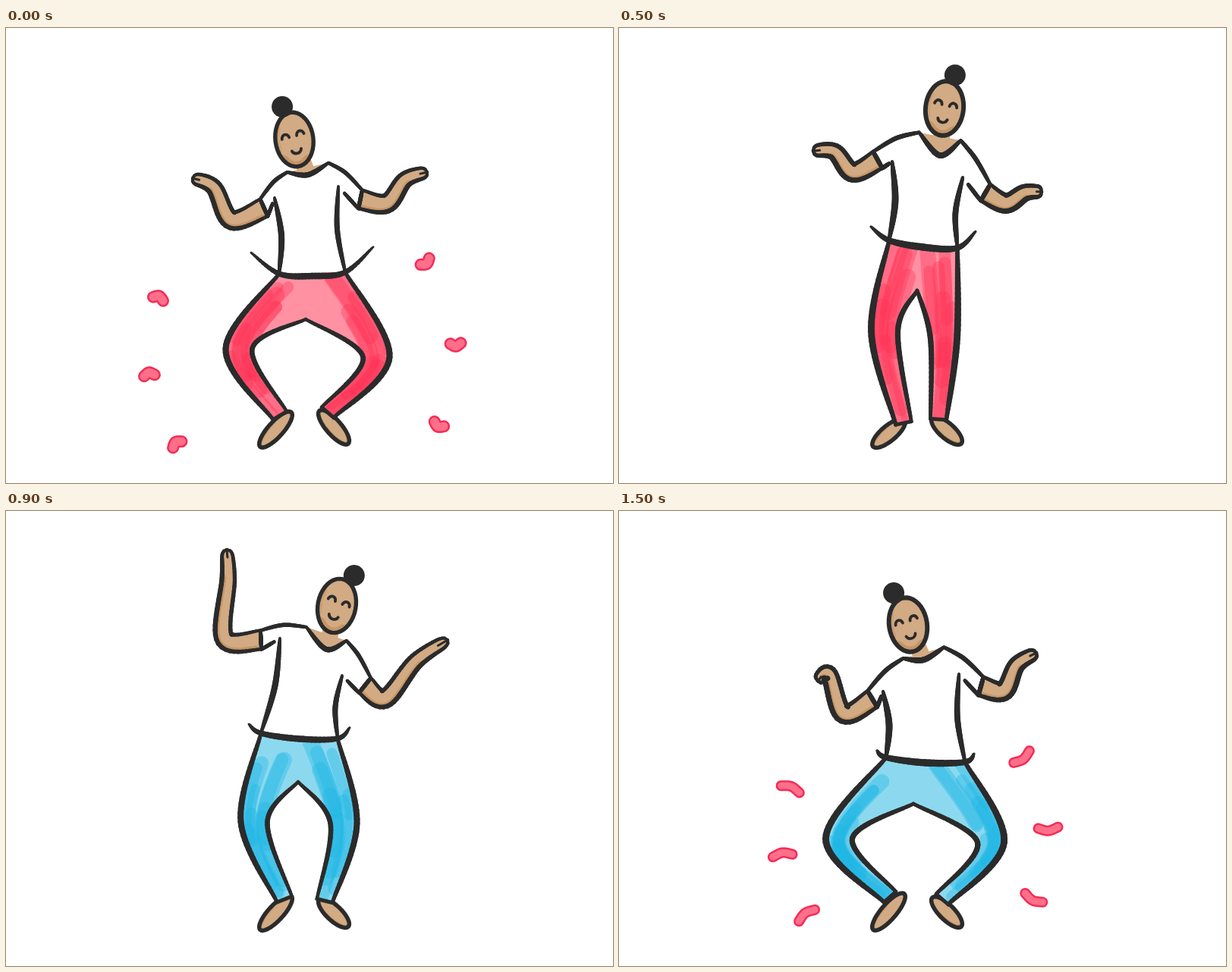
Write an HTML page with a canvas that moves like this. It is 800 px wide and 600 px high and loops after 1.6 s.

```html
<!DOCTYPE html>
<html lang="en">
<head>
<meta charset="utf-8">
<title>Dancer</title>
<style>
html, body { margin: 0; width: 100%; height: 100%; overflow: hidden; background: #fff; }
canvas { display: block; }
</style>
</head>
<body>
<canvas id="stage" width="800" height="600"></canvas>
<script>
const ctx = document.getElementById('stage').getContext('2d');
const STEP = 100, STEPS = 16, SAMPLES = 40;
const INK = '#2b2b2b', SKIN = ['#d2aa83', '#a8651c'];
const PINK = ['#ff91a3', '#ff3155'], BLUE = ['#8cd9ef', '#1cb3e2'];
const PINK_DASH = ['#ff6f8a', '#f42c55'], BLUE_DASH = ['#8adaf2', '#5cc5e6'];

// Joints of the key poses. pen: ink weight, flare of the shirt hem; head: x, y, tilt;
// arms: sleeve, elbow, wrist, fingertip; body: armpits, hips, crotch; legs: knee and ankle, twice.
const poses = [
  { at: 0, pen: [1, 37], head: [380, 147, -15],
    armL: [340, 237, 297, 253, 274, 210, 246, 198], armR: [467, 226, 502, 231, 526, 200, 555, 190],
    body: [354, 224, 438, 209, 360, 324, 447, 322, 395, 384], legs: [307, 423, 361, 511, 488, 434, 424, 507] },
  { at: 3, pen: [1, 8], head: [401, 100, -2],
    armL: [330, 166, 286, 170, 293, 218, 288, 250], armR: [490, 167, 520, 180, 506, 215, 497, 247],
    body: [352, 180, 482, 185, 355, 291, 454, 298, 403, 343], legs: [367, 400, 369, 523, 433, 400, 418, 520] },
  { at: 5, pen: [1.1, 24], head: [429, 106, 13],
    armL: [341, 174, 308, 190, 284, 163, 256, 162], armR: [483, 217, 510, 231, 535, 217, 557, 216],
    body: [360, 176, 453, 197, 356, 280, 446, 290, 393, 346], legs: [350, 400, 375, 521, 428, 410, 421, 516] },
  { at: 7, pen: [.95, 14], head: [443, 169, 24],
    armL: [350, 233, 309, 245, 308, 180, 287, 181], armR: [468, 280, 492, 304, 525, 266, 500, 252],
    body: [364, 233, 448, 253, 343, 334, 446, 341, 395, 399], legs: [277, 437, 353, 505, 498, 436, 428, 506] },
  { at: 9, pen: [1, 16], head: [436, 125, 22],
    armL: [336, 170, 288, 168, 293, 90, 291, 51], armR: [473, 230, 500, 247, 540, 198, 582, 170],
    body: [361, 168, 443, 217, 336, 293, 437, 300, 385, 357], legs: [327, 410, 367, 512, 445, 412, 420, 514] },
  { at: 13, pen: [1.4, 13], head: [388, 94, -10],
    armL: [331, 196, 292, 208, 266, 165, 239, 137], armR: [469, 188, 505, 202, 540, 170, 560, 196],
    body: [350, 186, 456, 182, 347, 292, 444, 297, 393, 342], legs: [344, 405, 368, 518, 430, 413, 412, 518] },
  { at: 15, pen: [1.1, 12], head: [381, 150, -18],
    armL: [334, 248, 296, 267, 277, 215, 262, 224], armR: [477, 231, 507, 237, 524, 203, 550, 187],
    body: [348, 238, 448, 215, 352, 325, 456, 331, 388, 386], legs: [290, 432, 357, 509, 490, 437, 426, 512] }
];

// Dashes fly outwards on a ring: [radius, length, width] per step.
const pinkAngles = [-37, -4, 27, 144, 172, 201], blueAngles = [-29, -2, 21, 146, 178, 220];
const bursts = { 15: [176, 13, 14], 0: [203, 7, 16], 7: [188, 20, 14], 8: [215, 10, 14] };

const rad = degrees => degrees * Math.PI / 180;
const noise = n => { const v = Math.sin(n * 12.9898) * 43758.5453; return v - Math.floor(v); };
const pairs = a => Array.from({ length: a.length / 2 }, (_, i) => [a[2 * i], a[2 * i + 1]]);
const add = ([x, y], dx, dy) => [x + dx, y + dy];
const mix = ([ax, ay], [bx, by], k = .5) => [ax + (bx - ax) * k, ay + (by - ay) * k];
const turn = (x, y, a) => [x * Math.cos(a) - y * Math.sin(a), x * Math.sin(a) + y * Math.cos(a)];

// Catmull-Rom step from b to c, used both for outlines and for motion.
const glide = (a, b, c, d, f) =>
  b + f / 2 * (c - a + f * (2 * a - 5 * b + 4 * c - d + f * (3 * (b - c) + d - a)));

function curve(...points) {
  const last = points.length - 1;
  return Array.from({ length: SAMPLES + 1 }, (_, n) => {
    const u = n / SAMPLES * last, i = Math.min(last - 1, Math.floor(u));
    const [a, b, c, d] = [points[Math.max(0, i - 1)], points[i], points[i + 1], points[Math.min(last, i + 2)]];
    return [0, 1].map(j => glide(a[j], b[j], c[j], d[j], u - i));
  });
}

const bow = (a, b, dx, dy) => curve(a, add(mix(a, b), dx, dy), b);

function poseAt(step) {
  const i = poses.findLastIndex(p => p.at <= step), n = poses.length;
  const [a, b, c, d] = [-1, 0, 1, 2].map(k => poses[(i + k + n) % n]);
  const f = (step - b.at) / (c.at - b.at), pose = {};
  for (const key of ['pen', 'head', 'armL', 'armR', 'body', 'legs']) {
    pose[key] = b[key].map((v, j) => glide(a[key][j], v, c[key][j], d[key][j], f));
  }
  return pose;
}

function trace(points) {
  ctx.beginPath();
  points.forEach(p => ctx.lineTo(...p));
}

function line(points, width, color = INK) {
  trace(points);
  ctx.lineWidth = width;
  ctx.strokeStyle = color;
  ctx.stroke();
}

let pen = 1;
// A brush line that swells from its ends to its middle.
function ink(points, end, middle) {
  for (let i = 1; i < points.length; i++) {
    line([points[i - 1], points[i]], pen * (end + (middle - end) * Math.sin(Math.PI * i / points.length)));
  }
}

// Fills a shape, then lays translucent strokes inside it: [points, width, alpha].
function wash(shape, [light, dark], strokes = []) {
  ctx.save();
  trace(shape);
  ctx.fillStyle = light;
  ctx.fill();
  ctx.clip();
  for (const [points, width, alpha] of strokes) {
    ctx.globalAlpha = alpha;
    line(points, width, dark);
  }
  ctx.restore();
}

const oval = (x, y, rx, ry, tilt) => Array.from({ length: SAMPLES + 1 }, (_, i) => {
  const a = i / SAMPLES * 2 * Math.PI;
  return add([x, y], ...turn(rx * Math.cos(a), ry * Math.sin(a), tilt));
});

function drawFoot(heel, toe) {
  const [dx, dy] = [toe[0] - heel[0], toe[1] - heel[1]];
  const shape = oval(...mix(heel, toe), Math.hypot(dx, dy) / 2 + 3, 10, Math.atan2(dy, dx));
  wash(shape, SKIN, [[shape.slice(0, 12), 8, .2]]);
  line(shape, 5.5);
}

// Offsets one side of an arm; it narrows to the wrist and rounds off at the fingertips.
function armSide(middle, side) {
  return middle.map((p, i) => {
    const [a, b] = [middle[Math.max(0, i - 1)], middle[Math.min(SAMPLES, i + 1)]];
    const t = i / SAMPLES, tip = Math.max(0, t - .88) / .12, angle = Math.atan2(b[1] - a[1], b[0] - a[0]);
    return add(p, ...turn(0, side * (12.5 - 6 * t) * Math.sqrt(1 - tip * tip), angle));
  });
}

function drawArm(joints, side, neck, armpit) {
  const middle = curve(...pairs(joints)), top = armSide(middle, side), low = armSide(middle, -side);
  wash([...top, ...low.slice().reverse()], SKIN, [[low.slice(3, 28), 11, .3]]);
  ink(top, 4, 5.5);
  ink(low, 4, 6.5);
  line(middle.slice(35), 3);
  ink(curve(top[0], low[0]), 4.5, 5.5);
  ink(curve(low[0], mix(low[0], armpit, .7)), 4, 5);
  ink(bow(neck, top[0], 0, -5), 4, 5.5);
}

function legSides(hip, crotch, knee, ankle, side) {
  const angle = Math.atan2(ankle[1] - knee[1], ankle[0] - knee[0]);
  const edge = (start, out) => curve(start, add(knee, out * 17.5, 0), add(ankle, ...turn(0, -out * 10.5, angle)));
  return [edge(hip, side), edge(crotch, -side)];
}

function drawPants(hips, crotch, legs, step) {
  const strokes = [], waist = mix(...hips);
  const sides = hips.map((hip, n) => {
    const [knee, ankle] = legs.slice(2 * n), side = n ? 1 : -1;
    const [outer, centre] = legSides(hip, waist, knee, ankle, side);
    for (let j = 0; j < 9; j++) {
      const r = k => noise(step * 31 + n * 97 + j * 7 + k), from = Math.floor(r(1) * 24), across = .1 + .8 * r(2);
      const band = outer.map((p, i) => mix(p, centre[i], across));
      strokes.push([band.slice(from, from + 12 + 14 * r(3)), 12 + 10 * r(4), .36]);
    }
    return legSides(hip, crotch, knee, ankle, side);
  });
  const [[lo, li], [ro, ri]] = sides;
  wash([...lo, ...li.slice().reverse(), ...ri, ...ro.slice().reverse()], step < 8 ? PINK : BLUE, strokes);
  for (const [outer, inner] of sides) {
    ink(outer, 4.5, 8);
    ink(inner, 4, 6.5);
    line([outer[SAMPLES], inner[SAMPLES]], 5);
  }
}

function arc(centre, radius, tilt, from, to) {
  ctx.beginPath();
  ctx.ellipse(...centre, radius, 6, tilt, from, to);
  ctx.lineWidth = 3.8;
  ctx.strokeStyle = INK;
  ctx.stroke();
}

function drawHead([x, y], tilt, collar) {
  const centre = [x, y], shape = oval(x, y, 25, 36, tilt / 2);
  wash(collar, SKIN);
  ctx.lineCap = 'butt';
  line([centre, collar[SAMPLES / 2]], 22, SKIN[0]);
  ctx.lineCap = 'round';
  ink(collar, 3.5, 7);
  wash(shape, SKIN, [[shape.slice(6, 16), 14, .3], [shape.slice(18, 24), 12, .15]]);
  line(shape, 5.4 * pen);
  trace(oval(...add(centre, ...turn(0, -46, tilt * 1.35)), 14, 14, 0));
  ctx.fillStyle = INK;
  ctx.fill();
  const brow = add(centre, 6 * Math.sin(tilt), -3);
  for (const side of [-10, 10]) arc(add(brow, ...turn(side, 0, tilt)), 5, tilt, 3.3, 6.1);
  arc(add(brow, ...turn(0, 16, tilt)), 6.5, tilt, .2, 2.9);
}

function drawDashes(step) {
  if (!bursts[step]) return;
  const [radius, reach, width] = bursts[step], blue = step === 7 || step === 8;
  const [light, dark] = blue ? BLUE_DASH : PINK_DASH;
  for (const degrees of blue ? blueAngles : pinkAngles) {
    const [near, middle, far] = [-reach, 0, reach].map(d => add([390, 430], ...turn(radius + d, d ? 0 : 4, rad(degrees))));
    line(curve(near, middle, far), width, dark);
    line(curve(near, middle, far), width - 5, light);
  }
}

function draw(step) {
  const pose = poseAt(step), [x, y, degrees] = pose.head, tilt = rad(degrees);
  const [pitL, pitR, hipL, hipR, crotch] = pairs(pose.body), legs = pairs(pose.legs), flare = pose.pen[1];
  pen = pose.pen[0];
  // The neckline leans with the head and hangs deeper the taller the dancer stands.
  const neck = [-28, 28].map(w => add([x + 5 - .85 * degrees, y + 37], ...turn(w, 0, tilt * .85)));
  const collar = bow(...neck, 0, 4 + (340 - hipL[1]) * .35);

  ctx.fillStyle = '#fff';
  ctx.fillRect(0, 0, 800, 600);
  drawDashes(step);
  drawFoot([374, legs[1][1] - 2], [337, 550]);
  drawFoot([415, legs[3][1]], [449, 546]);
  drawPants([hipL, hipR], crotch, legs, step);
  drawArm(pose.armL, 1, neck[0], pitL);
  drawArm(pose.armR, -1, neck[1], pitR);
  ink(bow(pitL, hipL, 6, 0), 3.5, 8);
  ink(bow(pitR, hipR, -6, 0), 3.5, 7);
  ink(curve(add(hipL, -flare, -.75 * flare), hipL, add(mix(hipL, hipR), 0, 4), hipR, add(hipR, flare, -.9 * flare)), 2.5, 8.5);
  drawHead(pose.head, tilt, collar);
}

ctx.lineCap = ctx.lineJoin = 'round';
let shown = -1;
function tick() {
  const step = Math.floor(performance.now() / STEP) % STEPS;
  if (step !== shown) draw(shown = step);
  requestAnimationFrame(tick);
}
tick();
</script>
</body>
</html>
```
